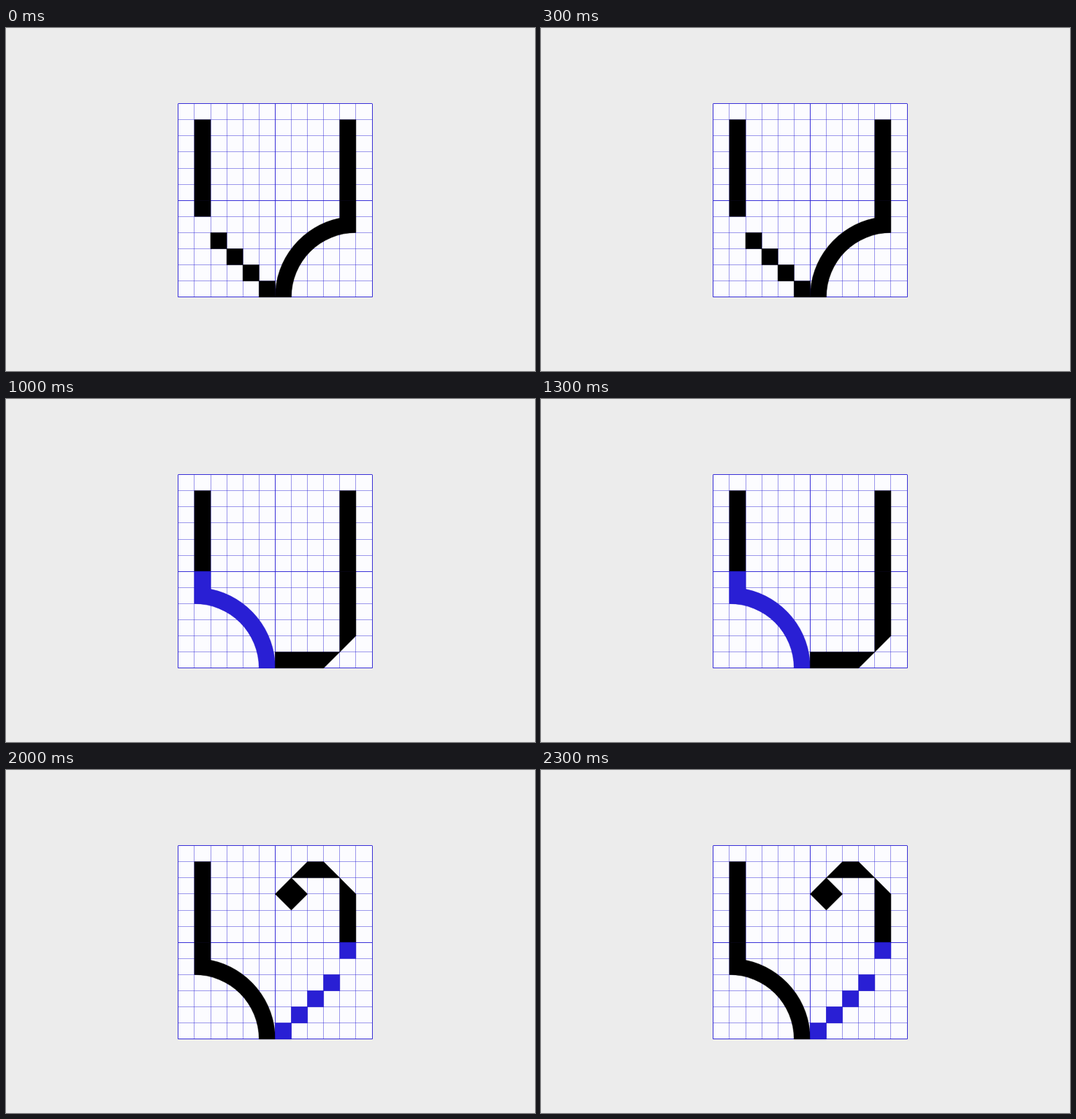
An HTML page with a canvas for the animation above (2500 ms loop, 724 by 470 pixels).

```html
<!DOCTYPE html>
<html lang="en">
<head>
<meta charset="utf-8">
<title>Letter grid</title>
<style>
  html, body { margin: 0; width: 100%; height: 100%; overflow: hidden; background: #ececec; }
  canvas { display: block; }
</style>
</head>
<body>
<canvas id="stage" width="724" height="470"></canvas>
<script>
const ctx = document.getElementById('stage').getContext('2d');
const CELL = 22.1, LEFT = 235.8, TOP = 103.6, SIZE = 12;
const STEP = 500;
const INK = '#000', ACTIVE = '#291fd4', EDGE = '#160bc6';

const gx = x => LEFT + x * CELL;
const gy = y => TOP + y * CELL;

function polygon(path, ...points) {
  points.forEach(([x, y], i) => path[i ? 'lineTo' : 'moveTo'](gx(x), gy(y)));
  path.closePath();
}

function box(path, x, y, w = 1, h = 1) {
  path.rect(gx(x), gy(y), w * CELL, h * CELL);
}

// Every part is built in the right half; the left half mirrors it.
const parts = {
  bar(path) {
    box(path, 10, 1, 1, 5);
  },
  hook(path) {
    polygon(path, [6, 3], [7, 2], [8, 3], [7, 4]);
    polygon(path, [7, 2], [8, 1], [9, 1], [10, 2]);
    polygon(path, [10, 2], [11, 3], [11, 6], [10, 6]);
  },
  stairs(path) {
    box(path, 10, 6);
    for (let i = 0; i < 4; i++) box(path, 9 - i, 8 + i);
  },
  arc(path) {
    path.moveTo(gx(10), gy(6));
    path.lineTo(gx(11), gy(6));
    path.lineTo(gx(11), gy(8));
    path.arc(gx(11), gy(12), 4 * CELL, -Math.PI / 2, Math.PI, true);
    path.lineTo(gx(6), gy(12));
    path.arc(gx(11), gy(12), 5 * CELL, Math.PI, Math.PI + Math.acos(1 / 5));
    path.closePath();
  },
  chamfer(path) {
    polygon(path, [10, 6], [11, 6], [11, 10], [10, 11]);
    polygon(path, [6, 11], [10, 11], [9, 12], [6, 12]);
  }
};

const shapes = {};
for (const [name, build] of Object.entries(parts)) {
  shapes[name] = new Path2D();
  build(shapes[name]);
}

const poses = [
  { topRight: 'bar', bottomLeft: 'stairs', bottomRight: 'arc' },
  { topRight: 'bar', bottomLeft: 'stairs', bottomRight: 'chamfer', active: 'bottomRight' },
  { topRight: 'bar', bottomLeft: 'arc', bottomRight: 'chamfer', active: 'bottomLeft' },
  { topRight: 'hook', bottomLeft: 'arc', bottomRight: 'chamfer', active: 'topRight' },
  { topRight: 'hook', bottomLeft: 'arc', bottomRight: 'stairs', active: 'bottomRight' }
];

function line(x1, y1, x2, y2) {
  ctx.beginPath();
  ctx.moveTo(x1, y1);
  ctx.lineTo(x2, y2);
  ctx.stroke();
}

function drawGrid() {
  const span = SIZE * CELL;
  ctx.fillStyle = '#fcfcff';
  ctx.fillRect(LEFT, TOP, span, span);
  ctx.lineWidth = 1;
  for (let i = 0; i <= SIZE; i++) {
    const strong = i % 6 === 0;
    ctx.strokeStyle = strong ? 'rgba(41,31,212,.9)' : 'rgba(41,31,212,.45)';
    const x = Math.floor(gx(i)) + 0.5, y = Math.floor(gy(i)) + 0.5;
    line(x, TOP, x, TOP + span);
    line(LEFT, y, LEFT + span, y);
  }
}

function drawPart(name, mirrored, active) {
  ctx.save();
  if (mirrored) {
    ctx.translate(2 * gx(6), 0);
    ctx.scale(-1, 1);
  }
  ctx.fillStyle = active ? ACTIVE : INK;
  ctx.fill(shapes[name]);
  ctx.strokeStyle = active ? EDGE : INK;
  ctx.lineWidth = 0.5;
  ctx.stroke(shapes[name]);
  ctx.restore();
}

function draw(time) {
  const pose = poses[Math.floor(time / STEP) % poses.length];
  ctx.fillStyle = '#ececec';
  ctx.fillRect(0, 0, 724, 470);
  drawGrid();
  drawPart('bar', true, false);
  for (const slot of ['topRight', 'bottomLeft', 'bottomRight'])
    drawPart(pose[slot], slot === 'bottomLeft', pose.active === slot);
}

let start;
function tick(now) {
  start ??= now;
  draw(now - start);
  requestAnimationFrame(tick);
}
draw(0);
requestAnimationFrame(tick);
</script>
</body>
</html>
```
